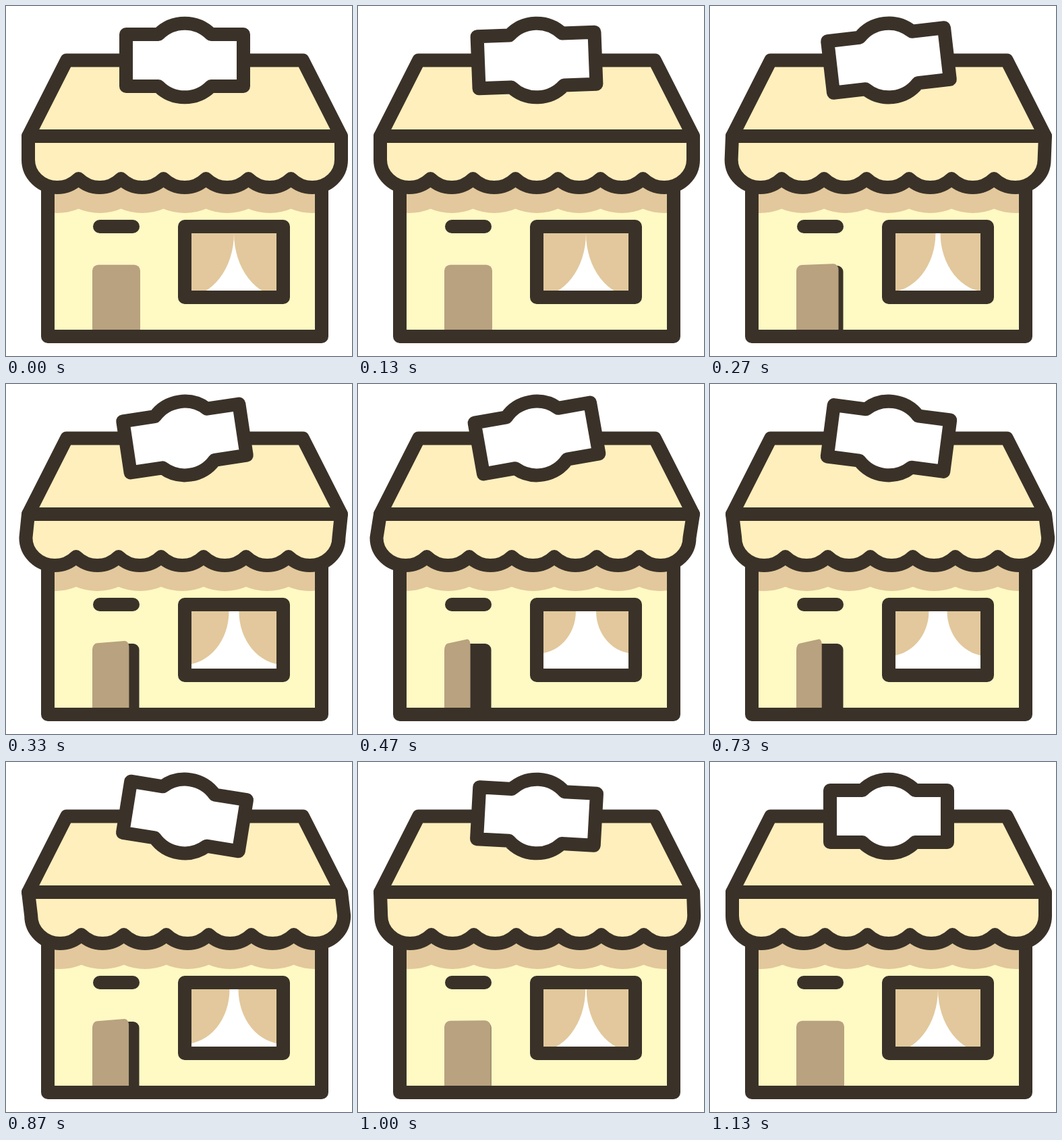
An HTML page with a canvas that plays this animation: 513x519 px, repeating every 1190 ms.

```html
<!DOCTYPE html>
<html lang="en">
<head>
<meta charset="utf-8">
<title>Little shop</title>
<style>
html, body { margin: 0; width: 100%; height: 100%; overflow: hidden; background: #fff; }
canvas { display: block; }
</style>
</head>
<body>
<canvas id="stage" width="513" height="519"></canvas>
<script>
const ctx = document.getElementById('stage').getContext('2d');
const LOOP = 1190, STEPS = 18;
const INK = '#3a3228', ROOF = '#ffefbc', WALL = '#fff9c4';
const SHADE = '#e2c89c', DOOR = '#b8a27f', WHITE = '#fff';

// Keys are [step, value] pairs, joined with a smooth ease.
const swing = [[0, 0], [6.6, -10], [7.05, -10], [12.15, 10], [16.7, 0]];
const sway = [[2.8, 0], [6.5, -5.6], [7.1, -5.5], [11.8, 5], [16.5, 0]];
const doorOpen = [[2, 0], [8.5, 1], [9.7, 1], [15.9, 0]];
const curtainOpen = [[2.2, 0], [8.3, 1], [9, 1], [15.9, 0]];

function valueAt(keys, s) {
  if (s <= keys[0][0]) return keys[0][1];
  for (let i = 1; i < keys.length; i++) {
    const [s0, a] = keys[i - 1], [s1, b] = keys[i];
    if (s < s1) {
      const x = (s - s0) / (s1 - s0);
      return a + (b - a) * x * x * (3 - 2 * x);
    }
  }
  return keys[keys.length - 1][1];
}

// Fifteen steps a second, each starting on a whole 10 ms.
function stepAt(ms) {
  let i = STEPS - 1;
  while (i > 0 && Math.round(i * 20 / 3) * 10 > ms) i--;
  return i;
}

function fill(path, color) {
  ctx.fillStyle = color;
  ctx.fill(path);
}

function stroke(path, color = INK, width = 20) {
  ctx.strokeStyle = color;
  ctx.lineWidth = width;
  ctx.stroke(path);
}

function rect(x, y, w, h, r = 0) {
  const p = new Path2D();
  p.roundRect(x, y, w, h, r);
  return p;
}

const house = rect(62, 240, 406, 250);
const frame = rect(265, 327, 146, 105);
const slot = new Path2D('M139 327H188');
const roof = new Path2D('M33 193L90 80.5H440L497 193Z');
const sign = new Path2D(
  'M178 42H226A54.75 54.75 0 0 1 304 42H352V119H304A54.75 54.75 0 0 1 226 119H178Z');

// The scalloped hem slides sideways while the top edge stays put.
function awningPath(d) {
  let s = `M33 193L${33 + d} 228A43 41 0 0 0 ${76 + d} 269A44.7 44.7 0 0 0 ${107.5 + d} 256`;
  for (let i = 1; i < 6; i++) s += `A44.7 44.7 0 0 0 ${107.5 + 63 * i + d} 256`;
  return new Path2D(s + `A44.7 44.7 0 0 0 ${454 + d} 269A43 41 0 0 0 ${497 + d} 228L497 193Z`);
}

function drawDoor(open) {
  fill(rect(142, 385, 55.5, 105, [0, 9, 0, 0]), INK);
  const width = 71 - 37.5 * open;
  ctx.save();
  ctx.transform(width / 71, -9.5 * open / 71, 0, 1, 128, 2.3 * open);
  fill(rect(0, 383.7, 71, 110, [9, 9, 0, 0]), DOOR);
  ctx.restore();
}

function drawWindow(open) {
  fill(frame, WHITE);
  ctx.save();
  ctx.clip(frame);
  const gap = 17 * open;
  for (const x of [265, 411]) {
    const drape = new Path2D();
    drape.ellipse(x, 337, 73 - gap, 94.5 - 2.09 * gap, 0, 0, 2 * Math.PI);
    fill(drape, SHADE);
  }
  ctx.restore();
  stroke(frame);
}

function drawSign(degrees) {
  ctx.save();
  ctx.translate(265, 80.5);
  ctx.rotate(degrees * Math.PI / 180);
  ctx.translate(-265, -80.5);
  fill(sign, WHITE);
  stroke(sign);
  ctx.restore();
}

function draw(s) {
  const awning = awningPath(valueAt(sway, s));
  ctx.fillStyle = WHITE;
  ctx.fillRect(0, 0, 513, 519);

  fill(house, WALL);
  ctx.save();
  ctx.clip(house);
  stroke(awning, SHADE, 76);
  ctx.restore();

  drawDoor(valueAt(doorOpen, s));
  stroke(house);
  stroke(slot);
  drawWindow(valueAt(curtainOpen, s));

  fill(awning, ROOF);
  fill(roof, ROOF);
  stroke(awning);
  stroke(roof);
  drawSign(valueAt(swing, s));
}

ctx.lineJoin = ctx.lineCap = 'round';
let start;
function tick(now) {
  start ??= now;
  draw(stepAt((now - start) % LOOP));
  requestAnimationFrame(tick);
}
draw(0);
requestAnimationFrame(tick);
</script>
</body>
</html>
```
